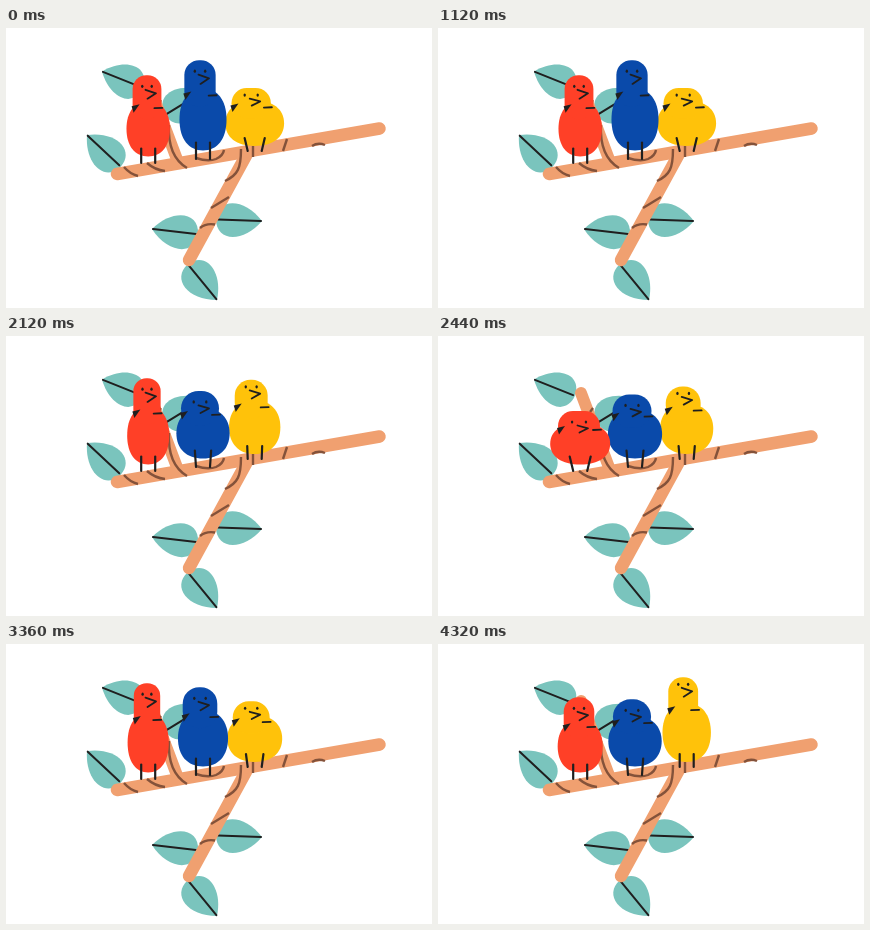
An HTML page with a canvas that plays this animation: 426x280 px, repeating every 4.4 s.

```html
<!DOCTYPE html>
<html lang="en">
<head>
<meta charset="utf-8">
<title>Bouncing birds</title>
<style>
html, body { margin: 0; width: 100%; height: 100%; overflow: hidden; background: #fff; }
canvas { display: block; width: 426px; height: 280px; }
</style>
</head>
<body>
<canvas id="stage" width="426" height="280"></canvas>
<script>
const ctx = document.getElementById('stage').getContext('2d');
const LOOP = 4400, RUN = 1720, STEP = 80, BOUNCE = 560;
const INK = '#1f1f1f', WOOD = '#f0a070', BARK = '#84523a', LEAF = '#7ac4bd';

// Stretch over one bounce: squash, settle, shoot up, sink
const HOP = [[0, 0.02], [40, 0], [120, 0.22], [200, 0.24], [320, 1], [400, 0.63], [480, 0.15], [560, 0.02]];

// All birds follow the same bounce, each with its own delay
const birds = [
  { color: '#ffc20a', delay: 0, headX: 245.2, bodyX: 248.7, low: 61, bottom: 118, width: 56, head: 19, brow: 7, ground: 123 },
  { color: '#0a4aaa', delay: 280, headX: 194, bodyX: 197, low: 65, bottom: 122.5, width: 56, head: 20.5, brow: 11, ground: 131 },
  { color: '#ff4027', delay: 400, headX: 141, bodyX: 142.2, low: 75, bottom: 128.5, width: 51, head: 18.5, brow: 11, ground: 135 }
];

function stretchAt(u) {
  const i = HOP.findIndex(([t]) => t > u);
  const [t0, a] = HOP[i - 1], [t1, b] = HOP[i];
  return a + (b - a) * (u - t0) / (t1 - t0);
}

function line(points, width) {
  ctx.beginPath();
  points.forEach(([x, y]) => ctx.lineTo(x, y));
  ctx.strokeStyle = INK;
  ctx.lineWidth = width;
  ctx.stroke();
}

function curve(path, color, width) {
  ctx.strokeStyle = color;
  ctx.lineWidth = width;
  ctx.stroke(new Path2D(path));
}

function leaf(bx, by, tx, ty) {
  const len = Math.hypot(tx - bx, ty - by), side = 22.5;
  ctx.save();
  ctx.translate(bx, by);
  ctx.rotate(Math.atan2(ty - by, tx - bx));
  ctx.beginPath();
  ctx.moveTo(-1, 0);
  ctx.bezierCurveTo(0, -side, 0.6 * len, -side, len, 0);
  ctx.bezierCurveTo(0.6 * len, side, 0, side, -1, 0);
  ctx.fillStyle = LEAF;
  ctx.fill();
  line([[1, 0], [len - 1, 0]], 2);
  ctx.restore();
}

function tree() {
  leaf(136, 59.5, 96, 43.5);
  leaf(114, 138, 81, 107);
  leaf(191, 206, 146, 201);
  leaf(211, 191.5, 256, 193);
  leaf(182.5, 237, 211, 272);
  leaf(160, 86.5, 198, 63);

  curve('M143 57L172 134', WOOD, 12);
  curve('M242 124L183 232', WOOD, 12.5);
  curve('M111 146L373.5 100.5', WOOD, 12.5);

  const marks = [
    'M118 139Q124 146 132 148', 'M141 135Q149 142 159 143',
    'M163 97C162 116 166 131 181 140', 'M152 76L155 72',
    'M190 130Q202 134 210 131Q217 128 218 122',
    'M235 121C235 140 232 147 219 153', 'M247 118L247 129',
    'M281 111L277 123', 'M306 118Q312 114 319 117',
    'M205 180L223 169', 'M194 200Q200 195 209 196.5'
  ];
  ctx.lineCap = 'butt';
  marks.forEach(m => curve(m, BARK, 2.4));
  ctx.lineCap = 'round';
}

// Slightly squared oval
function blob(cx, cy, rx, ry) {
  const kx = rx * 0.62, ky = ry * 0.62;
  ctx.beginPath();
  ctx.moveTo(cx, cy - ry);
  ctx.bezierCurveTo(cx + kx, cy - ry, cx + rx, cy - ky, cx + rx, cy);
  ctx.bezierCurveTo(cx + rx, cy + ky, cx + kx, cy + ry, cx, cy + ry);
  ctx.bezierCurveTo(cx - kx, cy + ry, cx - rx, cy + ky, cx - rx, cy);
  ctx.bezierCurveTo(cx - rx, cy - ky, cx - kx, cy - ry, cx, cy - ry);
  ctx.fill();
}

function drawBird(bird, time) {
  const u = (time + bird.delay) % BOUNCE;
  const stretch = stretchAt(u);
  const puff = Math.max(0, 1 - Math.abs(u - 40) / 60);

  const x = bird.headX, top = bird.low - 44 * stretch;
  const neck = bird.low + 18 - 22 * stretch;
  const half = bird.head - 6.5 * stretch + 2.5 * puff;
  const wide = (bird.width - 12 * stretch + 9 * puff) / 2;
  const crown = neck - 6;

  ctx.fillStyle = bird.color;
  blob(bird.bodyX, (crown + bird.bottom) / 2, wide, (bird.bottom - crown) / 2);
  ctx.beginPath();
  ctx.roundRect(x - half, top, half * 2, neck + 12 - top, half * 0.95);
  ctx.fill();

  const splay = Math.max(0, (wide - 25) * 0.7);
  for (const side of [-1, 1]) {
    const foot = bird.bodyX + side * 7;
    line([[foot + side * splay, bird.bottom - 8], [foot, bird.ground]], 2.2);
  }

  const eye = top + bird.brow, beak = 7 + 3 * stretch;
  ctx.fillStyle = INK;
  for (const side of [-1, 1]) {
    ctx.beginPath();
    ctx.ellipse(x + side * half * 0.33, eye, 1.2, 1.6, 0, 0, Math.PI * 2);
    ctx.fill();
  }
  line([[x - 1.5, eye + 3.5], [x + 9, eye + 3.5 + beak * 0.4], [x + 0.5, eye + 3.5 + beak]], 1.8);

  const wing = x - half + 3, mark = neck + 1;
  ctx.beginPath();
  ctx.moveTo(wing - 4, mark - 2);
  ctx.lineTo(wing + 4, mark - 4);
  ctx.lineTo(wing - 2, mark + 4.5);
  ctx.fill();
  line([[x + half - 7, mark], [x + half + 1, mark - 0.3]], 1.8);
}

function draw(now) {
  const time = now % LOOP;
  const start = Math.floor(time / RUN) * RUN;
  const held = start + Math.floor((time - start) / STEP) * STEP;
  ctx.fillStyle = '#fff';
  ctx.fillRect(0, 0, 426, 280);
  ctx.lineCap = ctx.lineJoin = 'round';
  tree();
  birds.forEach(b => drawBird(b, held));
}

const began = performance.now();
function tick() {
  draw(performance.now() - began);
  requestAnimationFrame(tick);
}
tick();
</script>
</body>
</html>
```
